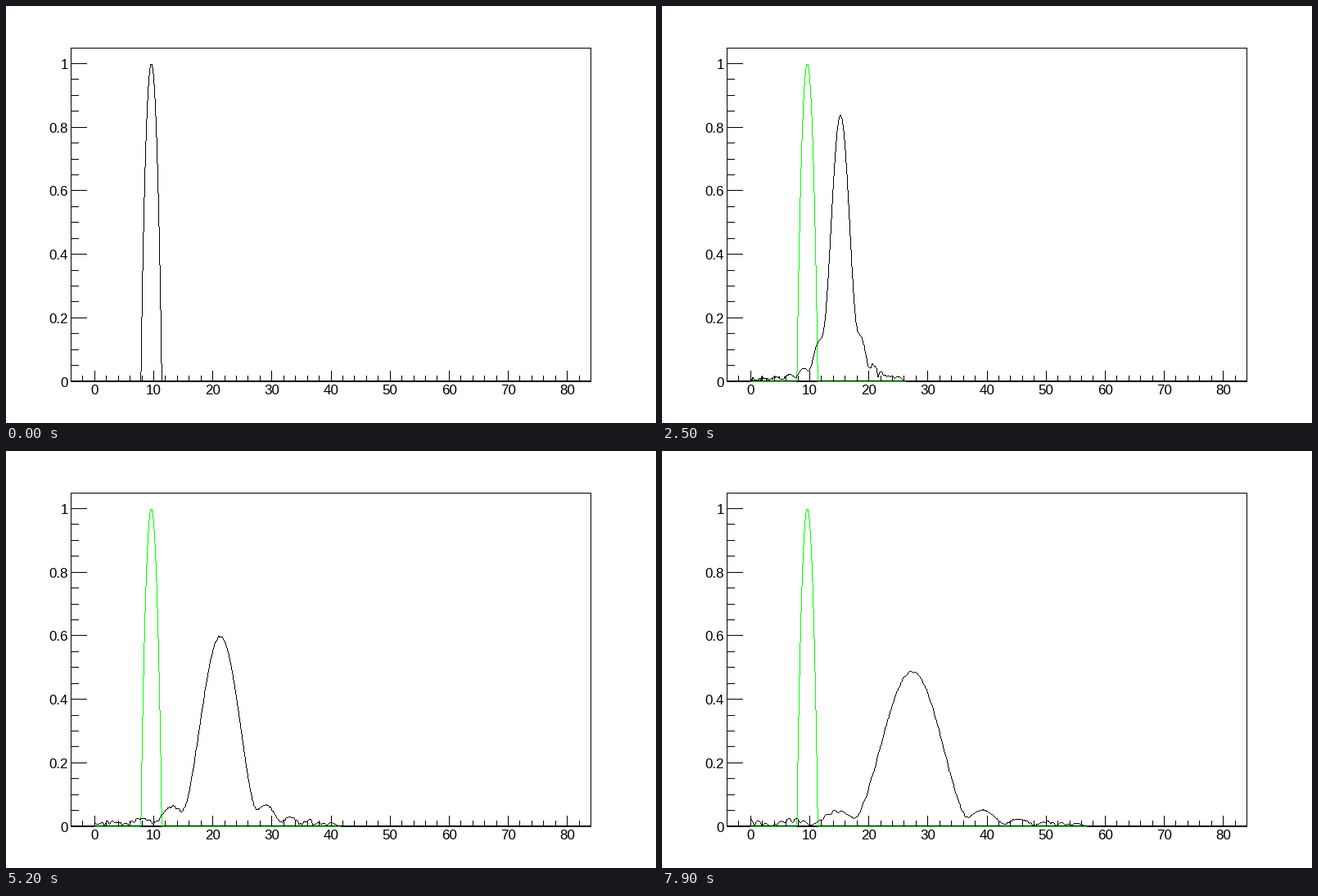
Write a matplotlib script that moves like this. It is 794 px wide and 510 px high and loops after 8000 ms.

```python
import numpy as np
import matplotlib.pyplot as plt
from matplotlib.animation import FuncAnimation

W, H, DPI = 794, 510, 64
PX = 72 / DPI  # one pixel in points
LEFT, RIGHT, TOP, BOTTOM = 0.1 * W, 0.9 * W, 0.1 * H, 0.9 * H
FRAMES, INTERVAL = 80, 100

# Wave packet on a grid, stepped by the Crank-Nicolson rule
N, DX, DT, STEPS = 4000, 0.02, 0.01, 5
CENTRE, HALF, POWER, K0 = 9.6, 1.76, 0.9, 4.5


def px(x):
    return LEFT + (x + 4) * (RIGHT - LEFT) / 88


def py(y):
    return BOTTOM - y * (BOTTOM - TOP) / 1.05


# Mirroring the packet about x = 0 gives a reflecting wall
pos = np.abs(np.fft.fftfreq(2 * N, 1 / (2 * N))) * DX
start = np.clip(1 - ((pos - CENTRE) / HALF) ** 2, 0, None) ** POWER
spectrum = np.fft.fft(start * np.exp(1j * K0 * pos))
k = 2 * np.pi * np.fft.fftfreq(2 * N, DX)
energy = (1 - np.cos(k * DX)) / DX**2
step_phase = 2 * np.arctan(energy * DT / 2)


def amplitude(frame):
    psi = np.fft.ifft(spectrum * np.exp(-1j * step_phase * STEPS * frame))
    return np.minimum(np.abs(psi[:N]), 1.05)


fig = plt.figure(figsize=(W / DPI, H / DPI), dpi=DPI, facecolor="white")
ax = fig.add_axes([0, 0, 1, 1])
ax.set_xlim(0, W)
ax.set_ylim(H, 0)
ax.axis("off")
crisp = dict(lw=PX, antialiased=True, snap=False, capstyle="butt")


def hline(y, x0, x1):
    y = np.floor(y) + 0.5
    ax.hlines(y, np.floor(x0), np.floor(x1) + 1, color="black", **crisp)


def vline(x, y0, y1):
    x = np.floor(x) + 0.5
    ax.vlines(x, np.floor(y0), np.floor(y1) + 1, color="black", **crisp)


def label(x, y, text, align):
    ax.text(x, y, text, ha=align, va="baseline", family="Liberation Sans",
            fontsize=17 * PX, color="black")


for y in (TOP, BOTTOM - 1, BOTTOM):
    hline(y, LEFT, RIGHT)
for x in (LEFT, RIGHT):
    vline(x, TOP, BOTTOM)

for v in range(-2, 84, 2):
    major = v % 10 == 0
    vline(px(v), BOTTOM - (13 if major else 7), BOTTOM)
    if major:
        label(px(v), 475, str(v), "center")

for i in range(21):
    major = i % 4 == 0
    hline(py(i / 20), LEFT, LEFT + (19 if major else 9))
    if major:
        label(76, py(i / 20) + 6.5, f"{i / 20:g}", "right")

# A curve is one run of whole pixels per screen column
columns = np.arange(int(px(0)), int(px(80)) + 1)
edges = np.append(columns, columns[-1] + 1)


def runs(values):
    rows = np.floor(np.interp(edges, px(pos[:N]), py(values)) + 0.5)
    top = np.minimum(rows[:-1], rows[1:])
    end = np.maximum(np.maximum(rows[:-1], rows[1:]), top + 1)
    mid = columns + 0.5
    return np.stack([np.column_stack([mid, top]),
                     np.column_stack([mid, end])], axis=1)


def curve(color, order):
    lines = ax.vlines(columns, TOP, BOTTOM, color=color, zorder=order, **crisp)
    lines.set_segments(runs(start[:N]))
    return lines


ghost = curve("#00ff00", 3)
wave = curve("black", 4)


def update(frame):
    wave.set_segments(runs(amplitude(frame)))
    return wave,


anim = FuncAnimation(fig, update, frames=FRAMES, interval=INTERVAL,
                     repeat=True, repeat_delay=0, blit=False)
plt.show()
```
